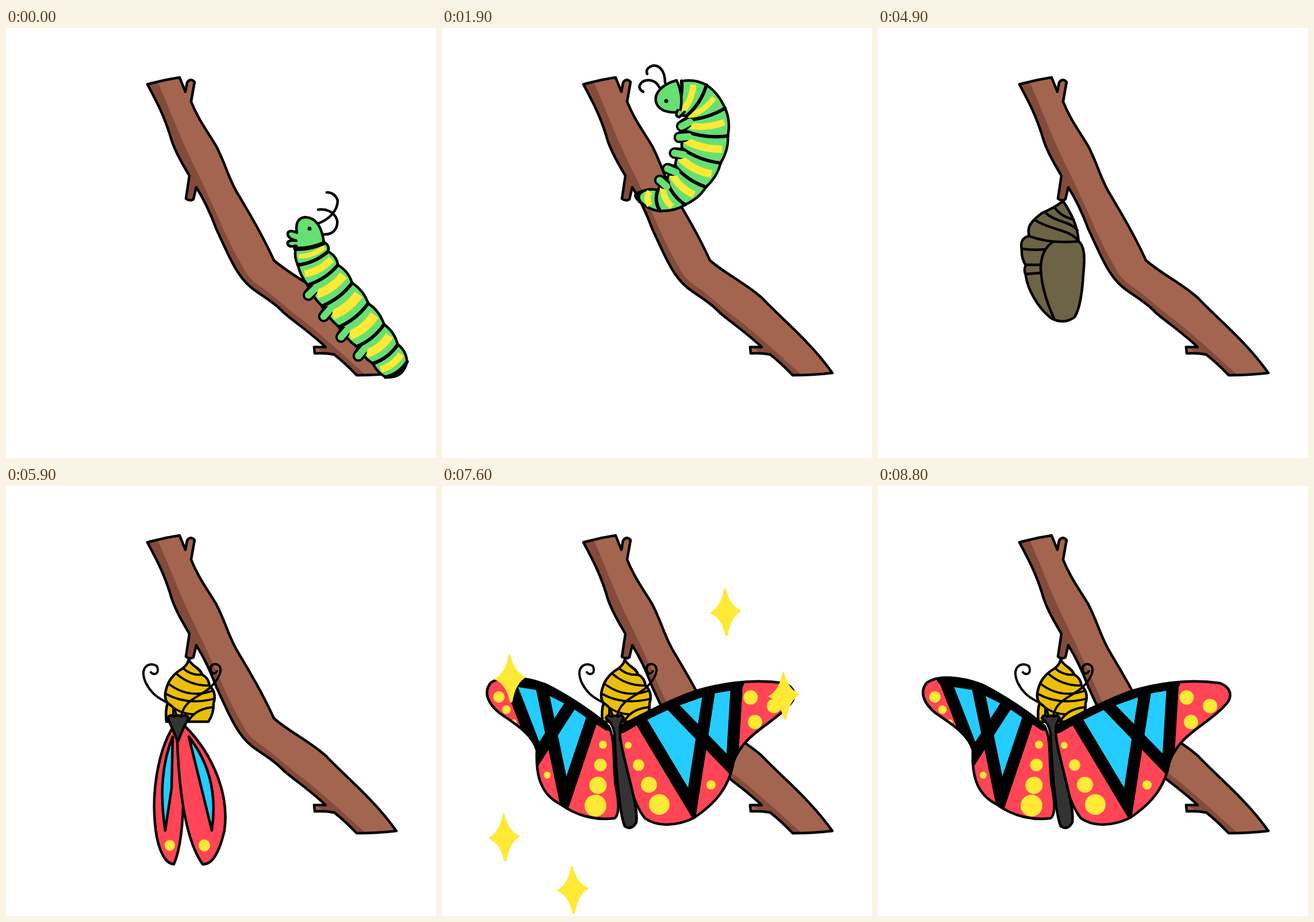
Animation, 748 px wide and 748 px high, one loop 9300 ms. Source, as an HTML page:

```html
<!DOCTYPE html>
<html lang="en">
<head>
<meta charset="utf-8">
<title>Metamorphosis</title>
<style>
html, body { margin: 0; width: 100%; height: 100%; overflow: hidden; background: #fff; }
svg { display: block; width: 100%; height: 100%; }
.ink { stroke: #000; stroke-width: 4.5; stroke-linejoin: round; stroke-linecap: round; }
.line { fill: none; }
.red { fill: #ff4556; }
.blue { fill: #24ccff; }
.yellow { fill: #ffe935; }
.green { fill: #66e073; }
.dark { fill: #333; }
.gold { fill: #e9bf0c; }
.vein { fill: none; stroke: #000; stroke-width: 21; stroke-miterlimit: 10; }
.rim { fill: none; stroke: #000; stroke-width: 26; stroke-linejoin: round; stroke-linecap: round; }
</style>
</head>
<body>
<svg viewBox="0 0 748 748" xmlns="http://www.w3.org/2000/svg">
  <defs>
    <path id="wood" d="M246,98 Q275,90 302,86 L312,111 L315,95 Q321,86 328,94 L322,128 C335,160 348,176 366,206 C383,240 385,255 400,283 C422,320 445,358 466,404 C490,426 530,445 557,470 C590,505 640,545 679,600 Q645,604 610,604 Q590,583 571,568 Q555,565 537,566 L536,555 L556,555 C530,530 500,510 483,495 C465,475 440,463 426,451 C400,430 385,390 366,350 Q350,307 331,277 L326,298 Q320,302 313,297 L319,257 C300,225 290,205 285,185 C272,145 260,125 246,98Z"/>
    <clipPath id="woodClip"><use href="#wood"/></clipPath>
  </defs>
  <use href="#wood" fill="#a3654f"/>
  <path clip-path="url(#woodClip)" fill="#834b3a" d="M264,94 C280,130 300,182 312,207 C325,237 340,264 352,292 C370,330 390,380 410,412 Q420,435 440,448 C470,468 490,490 515,507 C560,543 590,572 626,604 L606,608 L420,460 L300,240 L240,98Z M318,255 L331,277 L326,300 L312,300Z"/>
  <use href="#wood" class="ink line"/>
  <g id="stage"></g>
</svg>
<script>
const LOOP = 9300, TICK = 100;
const stage = document.getElementById('stage');

const path = (d, cls, extra = '') => `<path d="${d}" class="${cls}" ${extra}/>`;
const group = (body, transform) => `<g transform="${transform}">${body}</g>`;
const dot = (x, y, r, cls = 'yellow') => `<circle cx="${x}" cy="${y}" r="${r}" class="${cls}"/>`;
const mix = (a, b, k) => a + (b - a) * k;
const lerp = (p, q, k) => p.map((v, i) => mix(v, q[i], k));
const at = p => p.map(v => v.toFixed(1)).join();
const push = (p, dir, d) => [p[0] + dir[0] * d, p[1] + dir[1] * d];
const repeat = (n, fn) => Array.from({ length: n }, (_, i) => fn(i));

// Caterpillar spine: samples a cubic curve from tail to head as [x, y, half width].
function spine(n, [a, b, c, d], tail, head, bulge) {
  return repeat(n + 1, i => {
    const k = i / n;
    const ab = lerp(a, b, k), bc = lerp(b, c, k), cd = lerp(c, d, k);
    const p = lerp(lerp(ab, bc, k), lerp(bc, cd, k), k);
    return [...p, mix(tail, head, k) + bulge * Math.sin(Math.PI * k)];
  });
}
const PIVOT = [322, 298];
const CLIMB = spine(7, [[679, 594], [645, 540], [526, 420], [528, 378]], 23, 25, 9);
const CURL = spine(8, [[346, 293], [430, 345], [520, 110], [411, 119]], 9, 27, 18);
const HANG = spine(8, [[319, 305], [295, 370], [308, 460], [340, 532]], 8, 26, 13);
const MOLT = spine(7, [[313, 318], [300, 360], [310, 430], [331, 482]], 16, 15, 12);

function ribs(pts) {
  return pts.map(([x, y, w], i) => {
    const a = pts[Math.max(i - 1, 0)], b = pts[Math.min(i + 1, pts.length - 1)];
    const len = Math.hypot(b[0] - a[0], b[1] - a[1]);
    const h = [(b[0] - a[0]) / len, (b[1] - a[1]) / len], n = [h[1], -h[0]];
    return { h, n, l: push([x, y], n, w), r: push([x, y], n, -w), back: push([x, y], h, -9) };
  });
}

function drawBody(pts, stripe, feet) {
  const rs = ribs(pts), tail = rs[0];
  let out = path(`M${at(tail.l)}Q${at(push(pts[0], tail.h, -20))} ${at(tail.r)}`, 'green ink');
  for (let i = 0; i + 1 < rs.length; i++) {
    const a = rs[i], b = rs[i + 1];
    const l = lerp(a.l, b.l, .5), r = lerp(a.r, b.r, .5);
    const size = Math.hypot(pts[i + 1][0] - pts[i][0], pts[i + 1][1] - pts[i][1]);
    out += path(`M${at(a.l)}Q${at(push(l, b.n, 5))} ${at(b.l)}Q${at(b.back)} ${at(b.r)}Q${at(push(r, b.n, -8))} ${at(a.r)}Q${at(a.back)} ${at(a.l)}Z`, 'green ink')
      + path(`M${at(lerp(l, r, .06))}Q${at(lerp(a.back, b.back, .5))} ${at(lerp(l, r, .95))}`, 'line',
        `stroke="#ffe935" stroke-width="${(size * stripe).toFixed(1)}"`);
  }
  for (const r of rs) out += path(`M${at(r.l)}Q${at(r.back)} ${at(r.r)}`, 'ink line', 'style="stroke-width:6"');
  for (let i = 2; i <= feet; i++) {
    const { n, h } = rs[i], p = lerp(rs[i - 1].l, rs[i].l, .72), tip = push(push(p, n, 9), h, -3);
    const limb = (inset, color, width) => path(`M${at(push(p, n, -inset))}L${at(tip)}`, 'line',
      `stroke="${color}" stroke-width="${width}" stroke-linecap="round"`);
    out += limb(0, '#000', 20) + limb(7, '#66e073', 12);
  }
  return out;
}

const climber = drawBody(CLIMB, .36, 5)
  + path('M543,340 C562,333 577,318 577,300 Q572,286 558,286 M553,359 C570,360 578,347 576,334 C570,318 555,314 543,316', 'ink line')
  + path('M503,383 C507,379 506,378 502,379 C494,382 489,378 490,373 Q493,368 505,370 C492,367 488,360 491,355 Q495,351 506,356 C503,340 508,330 521,329 C540,330 550,348 553,373 Q530,384 503,383Z', 'green ink')
  + path('M503,384 Q530,385 553,374', 'ink line', 'style="stroke-width:7"') + dot(528, 349, 3.5, 'black');

const curlHead = path('M388,95 C388,72 376,63 365,66 Q353,71 357,80 M378,103 C372,90 357,88 348,94 Q338,104 350,111', 'ink line')
  + path('M408,91 C382,98 367,115 373,131 C379,146 398,148 414,146 Q421,118 408,91Z', 'green ink')
  + path('M410,143 Q404,154 413,155 L422,146', 'green ink') + dot(390, 127, 3.5, 'black');

const heading = ([a, b]) => Math.atan2(b[1] - a[1], b[0] - a[0]) * 180 / Math.PI;
const CURL_HEADING = heading(CURL.slice(-2));

function curled(pts) {
  const end = pts.slice(-2), [x, y] = end[1];
  return drawBody(pts, .33, 6)
    + group(curlHead, `translate(${x} ${y}) rotate(${heading(end) - CURL_HEADING}) translate(-411 -119)`);
}

// Swings the body from curled to hanging, in polar steps around the twig.
function swing(k) {
  const polar = ([x, y, w]) => [Math.hypot(x - PIVOT[0], y - PIVOT[1]), Math.atan2(y - PIVOT[1], x - PIVOT[0]), w];
  return CURL.map((p, i) => {
    const [r, a, w] = lerp(polar(p), polar(HANG[i]), k);
    return [PIVOT[0] + r * Math.cos(a), PIVOT[1] + r * Math.sin(a), w];
  });
}

const molt = path('M318,301 L301,312 L326,326Z', 'green ink') + drawBody(MOLT, .6, 5)
  + path('M291,432 C298,462 325,481 346,484 C360,497 371,525 366,538 Q350,549 327,542 Q322,545 318,537 Q307,533 308,523 Q301,524 303,516 Q294,516 298,506 Q290,497 293,489 Q286,484 291,475 Q284,467 290,458Z', 'ink', 'fill="#c4f566"');

const LIME = [196, 245, 102], OLIVE = [109, 100, 69], GOLD = [210, 170, 30];

const pupa = tint =>
  path('M322,301 C338,325 347,345 349,371 C360,380 360,400 357,430 C355,465 350,490 342,503 Q322,517 300,504 C278,486 260,455 257,430 Q253,420 257,413 Q249,400 250,385 Q246,365 263,362 C258,345 268,335 285,322 Q308,312 322,301Z', 'ink', `fill="rgb(${tint.map(Math.round)})"`)
  + path('M307,312 Q318,328 340,333 M291,321 C308,338 335,336 347,352 M273,334 C300,352 335,350 349,371 M263,362 Q300,376 349,371 M303,373 C285,385 281,410 284,430 C287,460 297,485 306,505 M250,384 Q270,387 290,385 M257,412 H283 M257,428 L284,426', 'ink line');

const shell = path('M318,302 C323,314 338,316 341,328 Q352,333 354,347 Q367,360 361,378 Q362,395 352,410 H279 Q277,390 281,378 Q274,368 279,352 Q283,335 300,322 Q315,314 318,302Z', 'gold ink')
  + path('M308,317 Q322,330 341,328 M298,328 Q322,348 354,347 M284,345 Q318,370 357,357 M279,362 Q315,382 363,370 M281,377 Q300,396 325,397 M358,385 Q330,388 318,408 M291,388 V405', 'ink line', 'style="stroke-width:3.8"');

const feelers = path('M296,398 C291,370 262,380 243,342 C231,314 250,305 262,313 C268,323 260,332 252,324 M305,398 C314,364 348,368 368,335 C382,311 363,305 357,313 C353,324 362,331 367,322', 'ink line', 'style="stroke-width:4"');
const head = path('M281,403 Q287,396 292,401 Q299,397 305,401 Q314,396 318,404 Q308,420 299,445 Q291,425 281,403Z', 'dark ink');

// Spots: an even row between two [x, y, r] ends, or three around a centre.
const row = (n, a, b) => repeat(n, i => dot(...lerp(a, b, i / (n - 1)))).join('');
const triad = (x, y, r, turn) => repeat(3, i => {
  const a = (turn + i * 120) * Math.PI / 180;
  return dot(x + r * Math.cos(a), y + r * Math.sin(a), r * .5);
}).join('');

// A wing: two crossing bands with blue inside, a dark rim from tip to root, and spots.
function wing(id, outline, bandA, bandB, root, spots) {
  const bands = [bandA, bandB].map(b => 'M' + b.join(' '));
  const tops = [bandA[0], bandB[0], bandA[2], bandB[2]].sort((p, q) => p[0] - q[0]);
  if (root[0] < tops[0][0]) tops.unshift(root); else tops.push(root);
  return `<clipPath id="${id}"><path d="${outline}"/></clipPath>` + path(outline, 'red')
    + `<g clip-path="url(#${id})">${bands.map(d => path(d, 'blue')).join('')}`
    + `${bands.map(d => path(d, 'vein')).join('')}${path('M' + tops.join(' '), 'rim')}${spots}</g>`
    + path(outline, 'ink line');
}

const wingsDown =
  path('M243,590 C250,615 262,632 275,631 C292,625 300,580 300,518 L262,560Z', 'red ink')
  + path('M300,518 C300,560 293,590 297,603 C310,625 320,634 330,630 C345,620 350,605 354,592Z', 'red ink')
  + row(2, [270, 576, 19], [324, 572, 19])
  + wing('downLeft', 'M297,412 C260,406 215,410 180,418 C150,425 125,450 108,466 C85,485 80,505 88,530 C100,550 125,543 150,550 C175,560 190,590 222,597 C250,598 278,555 299,519 C289,480 296,450 297,412Z',
    [[136, 437], [164, 538], [228, 410]], [[183, 416], [221, 570], [265, 408]], [284, 408],
    row(3, [278, 457, 7], [265, 529, 14]) + triad(119, 509, 16, 76) + dot(192, 556, 6))
  + wing('downRight', 'M315,410 C350,405 400,410 440,425 C475,440 505,470 514,495 C520,525 510,545 490,552 C460,560 430,558 410,575 C395,595 370,602 355,595 C325,575 300,535 295,500 C290,475 300,440 315,410Z',
    [[331, 408], [384, 568], [414, 416]], [[368, 410], [431, 542], [472, 438]], [325, 407],
    row(3, [315, 451, 6], [331, 521, 14]) + triad(476, 511, 22, 16) + dot(407, 551, 6))
  + head;

const wingsUp =
  wing('upLeft', 'M290,418 C265,395 220,365 180,345 C145,332 105,328 85,342 C70,360 82,380 100,395 C125,412 158,432 165,460 C163,500 170,535 205,553 C235,575 270,582 300,578 Q312,570 302,520 C297,480 302,440 290,418Z',
    [[115, 334], [167, 468], [229, 372]], [[172, 343], [214, 545], [264, 396]], [290, 413],
    row(4, [280, 450, 7], [267, 556, 19]) + row(3, [99, 367, 10], [125, 411, 5]) + dot(183, 503, 6))
  + wing('upRight', 'M306,420 C340,402 390,375 440,357 C490,342 540,335 595,343 C618,352 615,370 605,380 C575,415 525,430 507,480 C500,520 480,550 437,578 C400,595 370,590 353,578 C330,550 315,480 306,420Z',
    [[341, 400], [434, 555], [466, 349]], [[393, 375], [504, 490], [513, 341]], [312, 417],
    row(4, [324, 451, 6], [378, 554, 18]) + triad(553, 387, 25, -10) + dot(468, 520, 8))
  + path('M285,404 Q289,396 294,401 Q300,398 306,401 Q312,396 316,404 Q305,416 312,450 C322,500 342,560 338,585 Q330,600 318,592 C308,570 302,480 300,430 Q297,412 285,404Z', 'dark ink');

const folded = k => group(
  path('M297,0 C265,40 250,120 262,190 Q272,235 292,236 Q318,180 303,0Z', 'red ink')
  + path('M303,0 C350,40 390,110 380,180 Q366,238 342,236 Q300,180 297,0Z', 'red ink')
  + path('M290,25 Q262,90 277,180 L288,110Z M318,25 Q372,90 358,180 L340,110Z', 'blue ink')
  + row(2, [285, 205, 9], [345, 205, 10]), `translate(0 410) scale(1 ${k})`) + head;

const emerged = wings => shell + wings + feelers;

// Stars jump outwards from the middle on every other beat.
const STARS = [[143, 346], [478, 241], [569, 372], [130, 595], [238, 677]];
const CENTRE = [340, 440];
const sparkle = spread => STARS.map(([x, y]) => {
  const a = Math.atan2(y - CENTRE[1], x - CENTRE[0]);
  return group(path('M0,-41 Q7,-10 28,-2 Q9,9 4,41 Q1,44 -1,40 Q-7,10 -28,2 Q-8,-9 -3,-39 Q-1,-43 0,-41Z', 'yellow'),
    `translate(${x + spread * Math.cos(a)} ${y + spread * Math.sin(a)})`);
}).join('');

function scene(t) {
  const step = from => Math.floor((t - from) / 200);
  if (t < 1400) {
    const k = step(0) / 6;
    return group(climber, `translate(${-238 * k} ${-272 * k})`);
  }
  if (t < 1900) return group(curled(CURL), `rotate(-58 ${PIVOT})`);
  if (t < 3200) return curled(swing(Math.min(step(1900) / 4, 1)));
  if (t < 3700) return molt;
  if (t < 4200) return group(pupa(LIME), 'rotate(-12 322 301)');
  if (t < 4700) return pupa(LIME);
  if (t < 5500) {
    const k = (step(4700) + 1) / 2;
    return pupa(k < 1 ? lerp(LIME, OLIVE, k) : lerp(OLIVE, GOLD, k - 1));
  }
  if (t < 5700) return emerged(head);
  if (t < 6300) return emerged(folded(t < 5900 ? .83 : 1.05));
  const beat = t < 7400 ? Math.min(step(6300), 3) : Math.min(step(7400), 7);
  const up = beat % 2 === 1;
  const stars = t >= 7400 && t < 8800 ? sparkle(up ? 27 : 0) : '';
  return emerged(up ? wingsUp : wingsDown) + stars;
}

const start = performance.now();
let shown = -1;
function render() {
  const tick = Math.floor((performance.now() - start) % LOOP / TICK);
  if (tick !== shown) stage.innerHTML = scene(tick * TICK);
  shown = tick;
  requestAnimationFrame(render);
}
render();
</script>
</body>
</html>
```
